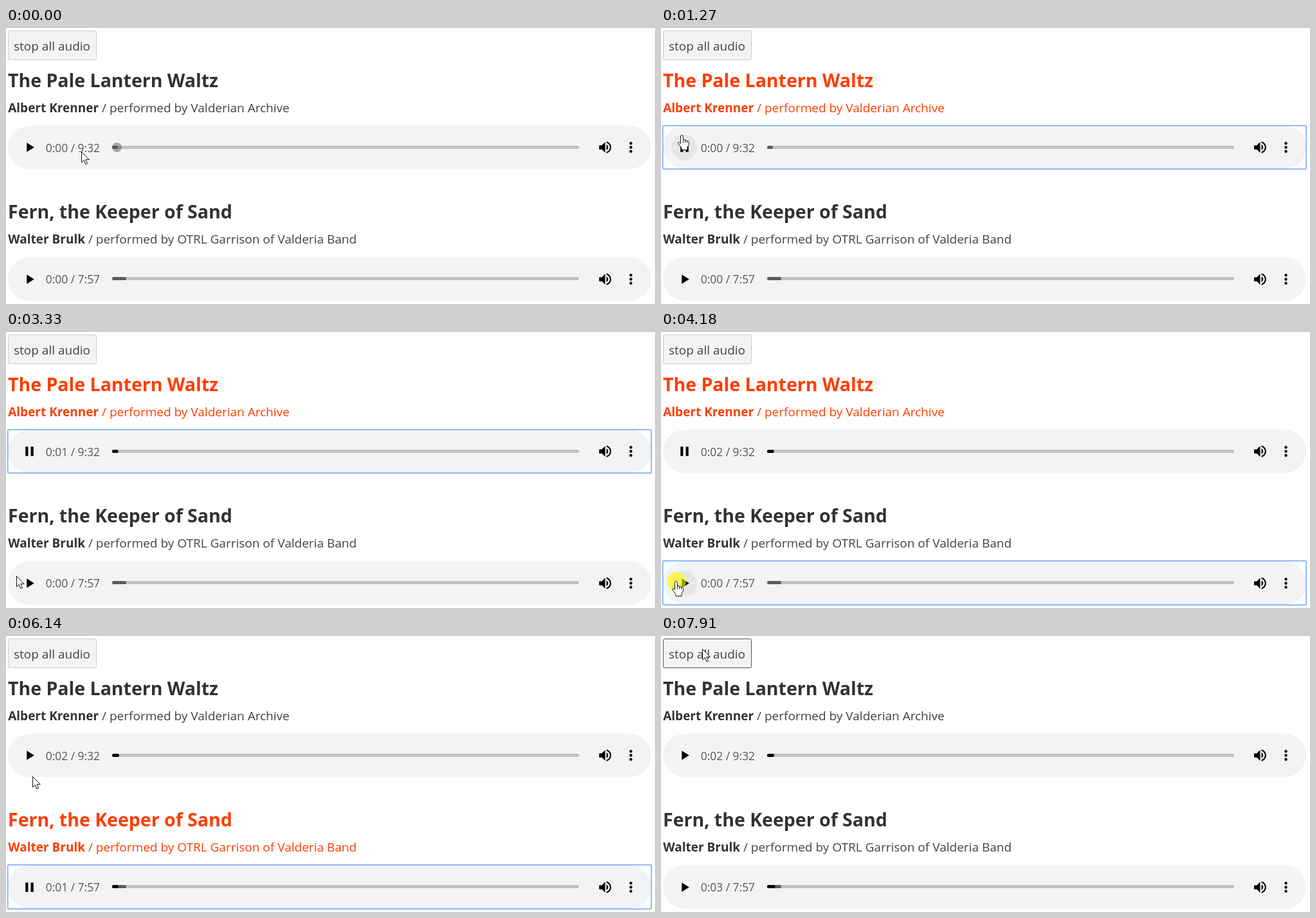
Recreate the animation shown at these times as an HTML page with a canvas. Size 1009 px wide and 429 px high, loop 9090 ms.

```html
<!DOCTYPE html>
<html lang="en">
<head>
<meta charset="utf-8">
<title>Audio players</title>
<style>
html, body { margin: 0; width: 100%; height: 100%; overflow: hidden; background: #fff; }
canvas { display: block; }
</style>
</head>
<body>
<canvas id="stage" width="1009" height="429"></canvas>
<script>
const ctx = document.getElementById('stage').getContext('2d');
const LOOP = 9090;
const FONT = '"Open Sans", "Noto Sans", sans-serif';
const DARK = '#323232', SOFT = '#424242', ORANGE = '#ff3d00';

// The moments at which the page reacts
const PRESS1 = 710, PLAY1 = 900, LEAVE1 = 1430;
const PRESS2 = 4180, PLAY2 = 4380, LEAVE2 = 4870;
const PRESS3 = 7600, STOP = 7850;

const tracks = [
  { y: 0, h: 67, mid: 185.5, title: 'The Pale Lantern Waltz', artist: 'Albert Krenner', band: 'Valderian Archive',
    length: 572, total: '9:32', buffer: 174, from: PLAY1, to: PLAY2, black: 1560, zero: 1820,
    focus: [PRESS1, PRESS2], ring: [PRESS1, LEAVE1] },
  { y: 204, h: 68, mid: 390.5, title: 'Fern, the Keeper of Sand', artist: 'Walter Brulk', band: 'OTRL Garrison of Valderia Band',
    length: 477, total: '7:57', buffer: 187, from: PLAY2, to: STOP, black: 4620, zero: 4600,
    focus: [PRESS2, PRESS3], ring: [PRESS2, LEAVE2] }
];

// Pointer path: time, x, y
const path = [
  [0, 118, 193], [60, 118, 193], [570, 32, 182], [710, 32, 182], [900, 32, 182],
  [1270, 33, 167], [1430, 33, 167], [1690, 28, 256], [1850, 28, 256], [2580, 8, 358],
  [2770, 7, 366], [2840, 7, 366], [3640, 24, 388], [4830, 24, 388], [5240, 36, 333],
  [5600, 37, 284], [5940, 37, 284], [6670, 55, 47], [6930, 55, 47], [6970, 66, 25],
  [7100, 66, 18], [7340, 66, 18], [7580, 65, 21], [LOOP, 65, 21]
];

const ICONS = {
  play: new Path2D('M8 5v14l11-7z'),
  pause: new Path2D('M6 5h4v14H6zM14 5h4v14h-4z'),
  volume: new Path2D('M3 9v6h4l5 5V4L7 9zM16.5 12c0-1.77-1-3.3-2.5-4v8c1.5-.7 2.5-2.2 2.5-4z' +
    'M14 3.2v2.1c2.9.9 5 3.5 5 6.7s-2.1 5.8-5 6.7v2.1c4-.9 7-4.5 7-8.8s-3-7.9-7-8.8z')
};
const ARROW = new Path2D('M0 0V16.5L3.8 13L6.4 19.3L9 18.2L6.4 12.1H11.8Z');
const HAND = new Path2D('M-2 13V2Q-2 0 0 0Q2 0 2 2V7Q4.5 6 5 8Q7.5 7.2 8 9.2' +
  'Q11 8.8 11 11V15L8.5 19V23H-.5V20L-5.6 13.5Q-6.3 11-4 11Z');
const HAND_LINES = new Path2D('M2 7V12M5 8V12M8 9V12');
const BEAM = new Path2D('M-3 -7H-1M1 -7H3M0 -7V7M-3 7H-1M1 7H3');

const within = (t, [a, b]) => t >= a && t < b;

function text(str, x, y, size, color, weight = 400) {
  ctx.font = `${weight} ${size}px ${FONT}`;
  ctx.fillStyle = color;
  ctx.fillText(str, x, y);
  return x + ctx.measureText(str).width;
}

function box(x, y, w, h, r, fill, stroke, line = 1) {
  ctx.beginPath();
  ctx.roundRect(x, y, w, h, r);
  if (fill) { ctx.fillStyle = fill; ctx.fill(); }
  if (stroke) { ctx.strokeStyle = stroke; ctx.lineWidth = line; ctx.stroke(); }
}

function disc(x, y, r, fill) {
  ctx.beginPath();
  ctx.arc(x, y, r, 0, Math.PI * 2);
  ctx.fillStyle = fill;
  ctx.fill();
}

function icon(shape, x, y) {
  ctx.save();
  ctx.translate(x - 12.5, y - 12.5);
  ctx.scale(25 / 24, 25 / 24);
  ctx.fillStyle = '#000';
  ctx.fill(shape);
  ctx.restore();
}

function drawButton(t) {
  box(3.5, 4.5, 137, 45, 2, '#f3f3f3', t >= PRESS3 ? '#555' : '#cacaca');
  text('stop all audio', 12, 35, 19, SOFT);
}

function drawTrack(k, t) {
  const playing = within(t, [k.from, k.to]);
  const color = playing ? ORANGE : DARK;
  const seconds = Math.max(0, Math.min(t, k.to) - k.zero) / 1000;

  text(k.title, 3, k.y + 92, 28.5, color, 700);
  const x = text(k.artist, 3.2, k.y + 131, 19, color, 700);
  text(' / performed by ' + k.band, x, k.y + 131, 19, playing ? ORANGE : SOFT);

  box(3, k.y + 152, 1000, k.h, k.h / 2, '#f1f3f4');
  if (within(t, k.focus)) box(2.75, k.y + 151.75, 1000.5, k.h + 0.5, 1.5, null, '#6fa5f5', 1.5);
  if (within(t, k.ring)) disc(36, k.mid, 20, '#e4e6e7');

  icon(playing ? ICONS.pause : ICONS.play, 36.5, k.mid);
  text(`0:0${Math.floor(seconds)} / ${k.total}`, 61.7, k.y + 193, 17.4, '#585858');

  const end = 172.5 + seconds * 726 / k.length;
  box(165, k.y + 183, 726, 5, 2.5, '#c1c1c1');
  if (k === tracks[0] && t < 300) {
    const fade = Math.min(1, (300 - t) / 240);
    disc(172.5, k.mid, 7.5, `rgba(90,90,90,${0.5 * fade})`);
  }
  box(165, k.y + 183, Math.max(k.buffer, end) - 165, 5, 2.5, '#5a5a5a');
  if (t >= k.black) box(165, k.y + 183, end - 165, 5, 2.5, '#000');

  icon(ICONS.volume, 931.5, k.mid);
  for (let i = -1; i <= 1; i++) disc(971.5, k.mid + i * 6.25, 2.2, '#000');
}

function pointerAt(t) {
  let i = 1;
  while (i < path.length - 1 && path[i][0] < t) i++;
  const [t0, x0, y0] = path[i - 1], [t1, x1, y1] = path[i];
  const f = Math.min(1, (t - t0) / (t1 - t0));
  return [Math.round(x0 + (x1 - x0) * f), Math.round(y0 + (y1 - y0) * f)];
}

function pointerKind(x, y) {
  for (const k of tracks) {
    if (Math.hypot(x - 36, y - k.mid) < 20) return 'hand';
    const row = y - k.y;
    if (within(row, [66, 98]) || within(row, [112, 138])) return 'beam';
  }
  return 'arrow';
}

function drawPointer(t) {
  const [x, y] = pointerAt(t);
  const kind = pointerKind(x, y);
  const pressed = [[PRESS1, PLAY1], [PRESS2, PLAY2 + 60], [PRESS3, STOP]].some(p => within(t, p));
  if (pressed) disc(x, y, 15, 'rgba(255,248,0,.62)');
  ctx.save();
  ctx.translate(x - 0.5, y - 0.5);
  ctx.lineWidth = 1;
  ctx.strokeStyle = '#111';
  ctx.fillStyle = '#fff';
  if (kind === 'beam') {
    ctx.stroke(BEAM);
  } else {
    const shape = kind === 'hand' ? HAND : ARROW;
    ctx.fill(shape);
    ctx.stroke(shape);
    if (kind === 'hand') ctx.stroke(HAND_LINES);
  }
  ctx.restore();
}

function draw() {
  const t = performance.now() % LOOP;
  ctx.fillStyle = '#fff';
  ctx.fillRect(0, 0, 1009, 429);
  drawButton(t);
  for (const k of tracks) drawTrack(k, t);
  drawPointer(t);
  requestAnimationFrame(draw);
}
draw();
</script>
</body>
</html>
```
